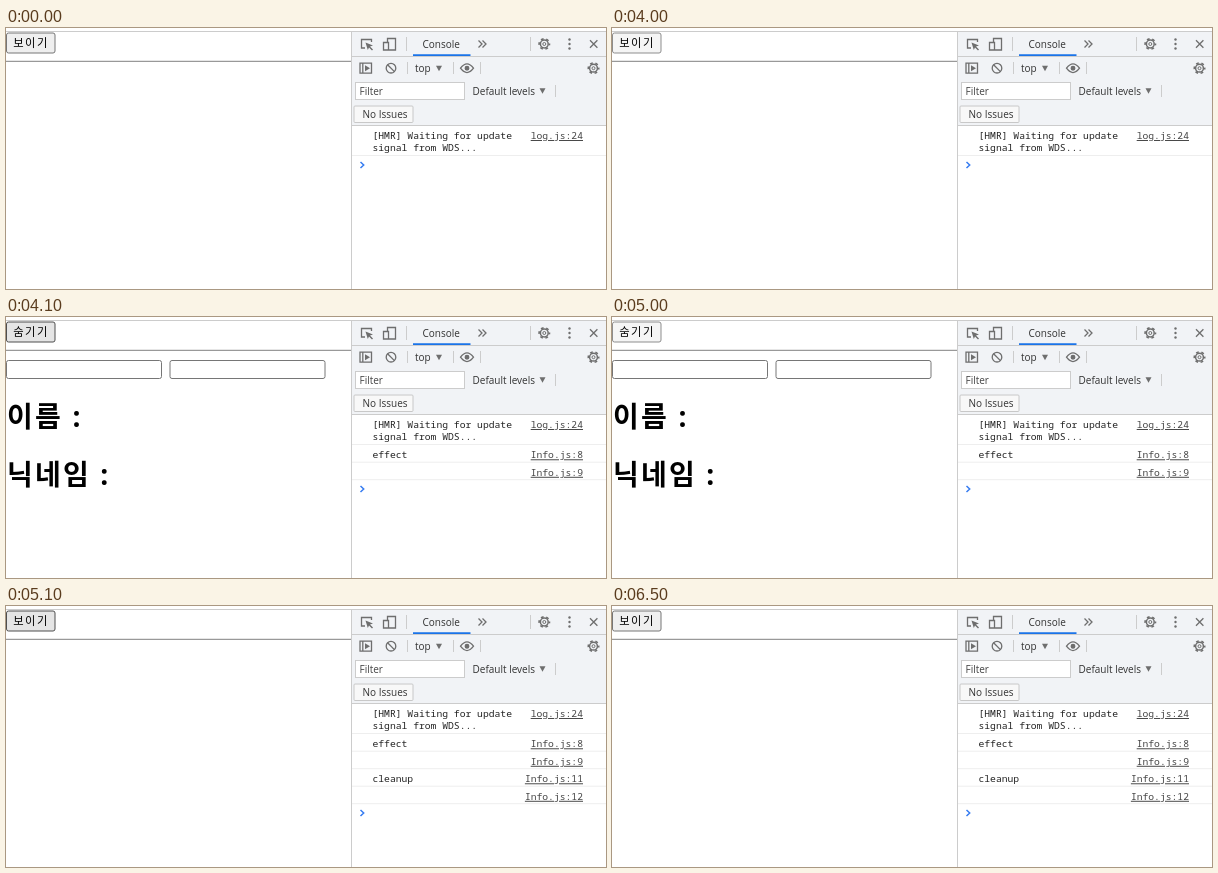
An HTML page for the animation above (7600 ms loop, 600 px wide and 261 px high).

```html
<!DOCTYPE html>
<html lang="ko">
<head>
<meta charset="utf-8">
<style>
  html, body { margin: 0; width: 100%; height: 100%; overflow: hidden; background: #fff; }
  svg { display: block; width: 600px; height: 261px; }
  text { white-space: pre; }
  .page { font-family: "Noto Sans", "Noto Sans CJK KR", "Noto Sans CJK", sans-serif; fill: #000; }
  .label { font-size: 11.3px; letter-spacing: 1.4px; }
  .title { font-size: 28px; font-weight: 700; letter-spacing: 2.2px; }
  .ui { font: 10px "Open Sans", sans-serif; fill: #333; }
  .log { font: 9.7px "Noto Sans Mono", monospace; fill: #222; }
  .link { text-anchor: end; text-decoration: underline; fill: #444; }
  .field { fill: #fff; stroke: #767676; }
  .rule { stroke: #ccc; }
  .icon { fill: none; stroke: #6e6e6e; stroke-width: 1.3; }
  .solid { fill: #6e6e6e; }
</style>
</head>
<body>
<svg viewBox="0 0 600 261">
  <defs>
    <g id="gear" fill="none" stroke="currentColor">
      <circle r="3.9" stroke-width="1.5"/>
      <circle r="5.2" stroke-width="1.6" stroke-dasharray="2.72" stroke-dashoffset="1.36"/>
      <circle r="1.5" stroke-width="1"/>
    </g>
    <path id="drop" class="solid" d="M-3 -2.5H3L0 3Z"/>
  </defs>

  <path class="rule" d="M0 3.5H600"/>
  <g class="page">
    <rect id="button" x=".5" y="5" width="48.5" height="20" rx="2"/>
    <text id="label" class="label" x="7.3" y="19.4"></text>
    <path d="M0 33.3H345" stroke="#808080"/>
    <g id="form">
      <rect class="field" x=".5" y="43.5" width="155" height="18" rx="2"/>
      <rect class="field" x="164" y="43.5" width="155" height="18" rx="2"/>
      <text class="title" x="1" y="110">이름 :</text>
      <text class="title" x="1" y="167.5">닉네임 :</text>
    </g>
  </g>

  <rect x="346" y="4" width="254" height="93" fill="#f1f3f6"/>
  <path class="rule" d="M345.5 4V261M346 28.5H600M346 97.5H600M400.5 9V23M524.5 9V23M401.5 34V46M447.5 34V46M474.5 34V46M549.5 57V69"/>
  <path d="M407 27.2H464.5" stroke="#1a73e8" stroke-width="1.8"/>

  <g class="icon">
    <path d="M359 20H355.5V11.5H365.5V14"/>
    <path class="solid" stroke="none" d="M359.5 14.5L367 17.5L364 18.6L367 21.6L366 22.5L363 19.5L361.8 22Z"/>
    <path d="M381.5 14V10.5H389.5V22H382.5M377.5 14.5H382.5V22H377.5Z"/>
    <path d="M472.5 12.5L476 16L472.5 19.5M476.5 12.5L480 16L476.5 19.5"/>
    <path d="M584 12.3L591.4 19.7M591.4 12.3L584 19.7"/>
    <path d="M354 35.2H365.5V45.2H354ZM356.8 35V45"/>
    <path class="solid" stroke="none" d="M359 37.2L364 40.2L359 43.2Z"/>
    <circle cx="385" cy="40.2" r="4.8"/>
    <path d="M381.6 36.8L388.4 43.6"/>
    <path d="M454.5 40.2Q461 31.5 467.5 40.2Q461 48.9 454.5 40.2Z"/>
    <circle class="solid" cx="461" cy="40.2" r="1.8"/>
  </g>
  <g class="solid">
    <circle cx="563.5" cy="11.5" r="1.2"/>
    <circle cx="563.5" cy="16" r="1.2"/>
    <circle cx="563.5" cy="20.5" r="1.2"/>
  </g>
  <use href="#gear" x="538.3" y="16" color="#6e6e6e"/>
  <use id="settings" href="#gear" x="587.5" y="40.2"/>
  <use href="#drop" x="433" y="40.2"/>
  <use href="#drop" x="536.5" y="62.8"/>

  <rect class="rule" x="349.5" y="54.5" width="109" height="17" fill="#fff"/>
  <rect x="348" y="78" width="59" height="16.5" rx="1" fill="#f8f8f8" stroke="#c8c8c8"/>
  <g class="ui">
    <text x="416.5" y="19.6">Console</text>
    <text x="409" y="43.6">top</text>
    <text x="353.5" y="67.3" fill="#444">Filter</text>
    <text x="466.5" y="66.5">Default levels</text>
    <text x="356.5" y="90">No Issues</text>
  </g>

  <g class="log">
    <text x="366.5" y="111">[HMR] Waiting for update</text>
    <text x="366.5" y="123.2">signal from WDS...</text>
    <text class="link" x="577" y="111">log.js:24</text>
    <path d="M346 127.5H600" stroke="#eee"/>
    <g id="rows"></g>
  </g>
  <path id="prompt" d="M354.5 -3L357.7 0L354.5 3" fill="none" stroke="#367cf1" stroke-width="1.5"/>
</svg>

<script>
  const $ = id => document.getElementById(id);
  const LOOP = 7600, ROW = 17.5;
  const logs = [["effect", "Info.js:8"], ["", "Info.js:9"], ["cleanup", "Info.js:11"], ["", "Info.js:12"]];
  const looks = {
    idle: ["#efefef", "#767676"],
    hover: ["#e5e5e5", "#4f4f4f"],
    pressed: ["#f5f5f5", "#8d8d8d"]
  };
  // Start time, button look, form shown, number of extra log rows
  const steps = [
    [0, "idle", false, 0],
    [3600, "hover", false, 0],
    [4000, "pressed", false, 0],
    [4100, "hover", true, 2],
    [5000, "pressed", true, 2],
    [5100, "hover", false, 4],
    [6400, "idle", false, 4]
  ];

  $("rows").innerHTML = logs.map(([message, place], i) => {
    const y = 141.3 + i * ROW;
    return `<g><text x="366.5" y="${y}">${message}</text>
      <text class="link" x="577" y="${y}">${place}</text>
      <path d="M346 ${y + 3.9}H600" stroke="#eee"/></g>`;
  }).join("");

  function draw(now) {
    const t = now % LOOP;
    const [, look, open, count] = steps.findLast(step => t >= step[0]);
    const [fill, stroke] = looks[look];
    $("button").setAttribute("fill", fill);
    $("button").setAttribute("stroke", stroke);
    $("label").textContent = open ? "숨기기" : "보이기";
    $("form").style.display = open ? "" : "none";
    [...$("rows").children].forEach((row, i) => row.style.display = i < count ? "" : "none");
    $("prompt").setAttribute("transform", `translate(0 ${137 + count * ROW})`);
    $("settings").setAttribute("color", t >= 6400 && t < 6500 ? "#333" : "#6e6e6e");
  }

  const start = performance.now();
  function tick() {
    draw(performance.now() - start);
    requestAnimationFrame(tick);
  }
  tick();
</script>
</body>
</html>
```
